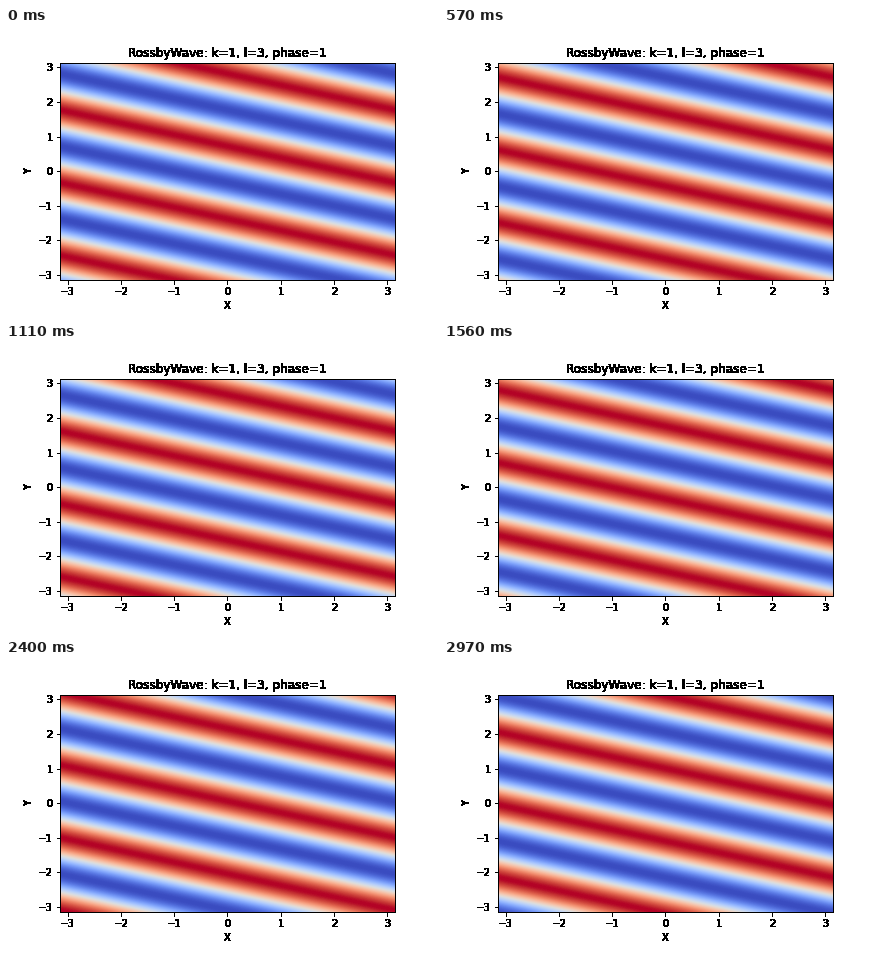
Recreate the animation shown at these times as a matplotlib script. Size 432 px wide and 288 px high, loop 3000 ms.

```python
import numpy as np
import matplotlib.pyplot as plt
from matplotlib.animation import FuncAnimation

FRAMES, INTERVAL = 100, 30
K, L, PHASE = 1, 3, 1
OMEGA = -18 / 99  # radians per frame; crests drift downwards
NX, NY = 670, 436


def centres(n):
    return -np.pi + (np.arange(n) + 0.5) * 2 * np.pi / n


def solid_ink(img, dpi):
    """Turn every touched pixel fully black, without soft edges."""
    out = np.zeros_like(img)
    out[..., 3] = img[..., 3] > 0
    return out, 0, 0


x, y = np.meshgrid(centres(NX), centres(NY))
theta = K * x + L * y + PHASE


def wave(i):
    return -np.cos(theta - OMEGA * i)


fig, ax = plt.subplots(figsize=(6, 4), dpi=72)
fig.subplots_adjust(left=0.125, right=0.9, bottom=0.125, top=0.88)
image = ax.imshow(wave(0), cmap="coolwarm", vmin=-1, vmax=1, origin="lower",
                  extent=(-np.pi, np.pi, -np.pi, np.pi), aspect="auto")
ax.set_xticks(range(-3, 4))
ax.set_yticks(range(-3, 4))
ax.set_xlabel("X")
ax.set_ylabel("Y")
ax.set_title(f"RossbyWave: k={K}, l={L}, phase={PHASE}")

inked = [ax.title, ax.xaxis.label, ax.yaxis.label, *ax.spines.values()]
for axis in (ax.xaxis, ax.yaxis):
    for tick in axis.get_major_ticks():
        inked += [tick.label1, tick.tick1line]
for artist in inked:
    artist.set_agg_filter(solid_ink)


def update(i):
    image.set_data(wave(i))
    return [image]


anim = FuncAnimation(fig, update, frames=FRAMES, interval=INTERVAL,
                     repeat=True, repeat_delay=0, blit=False)
plt.show()
```
